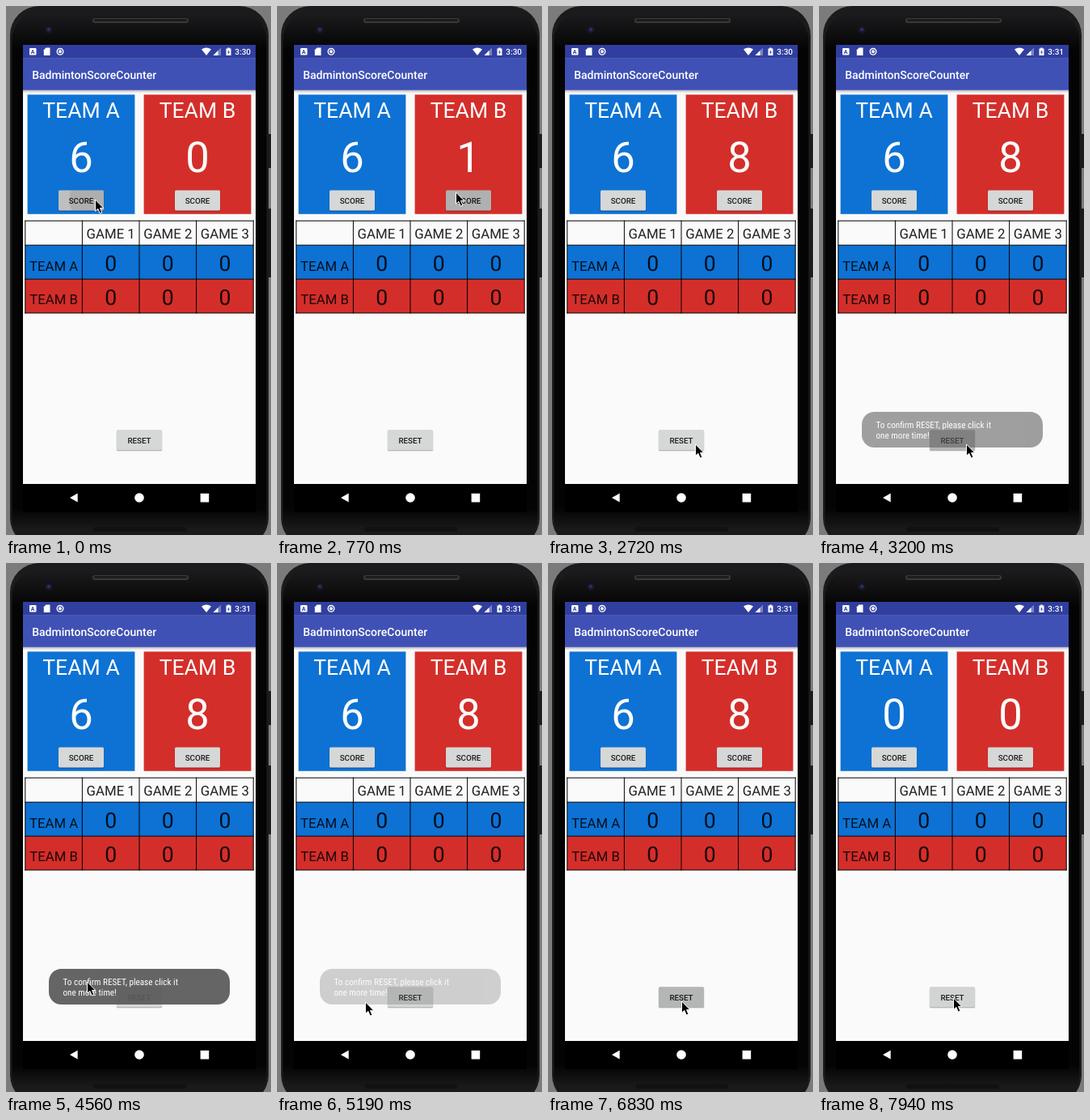
These frames come from a looping animation (328x653 px, 8 s). An HTML page:

```html
<!DOCTYPE html>
<html lang="en">
<head>
<meta charset="utf-8">
<title>Score counter</title>
<style>
html, body { margin: 0; width: 100%; height: 100%; overflow: hidden; background: #7b7b7b; }
svg { display: block; width: 328px; height: 653px; }
text { font-family: Roboto, Arial, sans-serif; text-rendering: geometricPrecision; }
.mid { text-anchor: middle; }
.white { fill: #fff; }
.dark { fill: #000; fill-opacity: .87; }
.team { font-size: 26.6px; }
.score { font-size: 52.5px; }
.cell { font-size: 16.8px; }
.label { font-size: 9.8px; font-weight: 500; }
.toast { font: 11.2px "Roboto Condensed", Roboto, sans-serif; font-stretch: 75%; }
</style>
</head>
<body>
<svg viewBox="0 0 328 653">
  <defs>
    <linearGradient id="body" x2="0" y2="1">
      <stop offset="0" stop-color="#1c1c1e"/><stop offset=".07" stop-color="#040405"/>
      <stop offset=".93" stop-color="#040405"/><stop offset=".97" stop-color="#1a1a1a"/>
    </linearGradient>
    <linearGradient id="shade" x2="0" y2="1">
      <stop offset="0" stop-color="#000" stop-opacity=".28"/><stop offset="1" stop-color="#000" stop-opacity="0"/>
    </linearGradient>
    <clipPath id="clipA"><rect x="65" y="227.5" width="56" height="25" rx="1.5"/></clipPath>
  </defs>

  <!-- phone -->
  <rect width="328" height="653" fill="#7b7b7b"/>
  <rect x="325" y="158" width="3" height="42" fill="#1c1c1e"/>
  <rect x="325" y="250" width="3" height="85" fill="#1c1c1e"/>
  <rect x="5" y="0" width="320" height="668" rx="36" fill="#1b1b1d"/>
  <rect x="7.5" y="8" width="315" height="658" rx="34" fill="url(#body)"/>
  <rect x="107" y="15" width="119" height="6" rx="3" fill="#3b3937"/>
  <rect x="109" y="16" width="115" height="3" rx="1.5" fill="#1d1c1c"/>
  <circle cx="53" cy="29" r="5.5" fill="#14151d"/>
  <circle cx="53" cy="29" r="2.5" fill="#272c5c"/>
  <rect x="108" y="643" width="115" height="6" rx="3" fill="#111"/>

  <!-- screen -->
  <rect x="21" y="48" width="288" height="577" fill="#000"/>
  <rect x="21" y="48" width="288" height="542" fill="#fafafa"/>
  <rect x="21" y="103.5" width="288" height="4" fill="url(#shade)"/>
  <rect x="21" y="64.8" width="288" height="39" fill="#3f51b5"/>
  <rect x="21" y="48" width="288" height="16.8" fill="#303f9f"/>
  <g fill="#fff">
    <rect x="29" y="52" width="8.5" height="8.5" rx="1"/>
    <path d="M49.5 51.5H54.5V61H46.800V54.3Z"/>
    <circle cx="67" cy="56.3" r="3.8" fill="none" stroke="#fff" stroke-width="1.4"/>
    <circle cx="67" cy="56.3" r="2"/>
    <path d="M242 53.5Q248 49.5 254 53.5L248 61Z"/>
    <path d="M266 51.5V61H256.5Z" fill-opacity=".35"/>
    <path d="M262.5 55V61H256.5Z"/>
    <path d="M274.3 51.5h2.4v1h1.8v8.5h-6v-8.5h1.8z"/>
    <path d="M79 607L88.7 601.5V612.5Z"/>
    <circle cx="165" cy="607" r="5.8"/>
    <rect x="240.6" y="601.8" width="10.6" height="10.6" rx=".5"/>
  </g>
  <path d="M276 54l-2 3.5h1.4l-.4 2.5 2-3.5h-1.4z" fill="#303f9f"/>
  <text x="33.2" y="58.9" class="mid" font-size="7" font-weight="700" fill="#303f9f">A</text>
  <text id="clock" x="303" y="60.2" text-anchor="end" class="white" font-size="10" font-weight="500"></text>
  <text x="32.2" y="89.5" class="white" font-size="14" font-weight="500">BadmintonScoreCounter</text>

  <g id="cards"></g>
  <g id="table"></g>
  <g id="buttons"></g>
  <circle id="ripple" cx="110" cy="239" r="31.5" fill-opacity=".09" clip-path="url(#clipA)"/>

  <g id="toast">
    <rect x="53" y="501" width="224" height="44" rx="15.5" fill="#5a5a5a" fill-opacity=".93"/>
    <text x="70.5" y="521" class="toast white">To confirm RESET, please click it</text>
    <text x="70.5" y="534.3" class="toast white">one more time!</text>
  </g>
  <path id="cursor" d="M.5 0V14.3L3.8 11.3L6.3 17.1L8.9 16L6.5 10.4H10.8Z" stroke="#fff" stroke-width="1" stroke-linejoin="round"/>
</svg>
<script>
const LOOP = 8000;
const BLUE = '#0d72d4', RED = '#d42e2a';
const $ = id => document.getElementById(id);
const add = (id, markup) => $(id).insertAdjacentHTML('beforeend', markup);
const rect = (x, y, w, h, fill, more = '') =>
  `<rect x="${x}" y="${y}" width="${w}" height="${h}" fill="${fill}" ${more}/>`;
const label = (x, y, cls, str, more = '') =>
  `<text x="${x}" y="${y}" class="mid ${cls}" ${more}>${str}</text>`;

function card(mid, name, fill) {
  add('cards', rect(mid - 66.4, 109.4, 132.8, 147.4, fill) +
    label(mid, 138.1, 'team white', 'TEAM ' + name) +
    label(mid, 205.3, 'score white', '', `id="score${name}"`));
}

function button(id, mid, y, str) {
  const x = mid - 28;
  add('buttons', rect(x - .5, y + 1, 57, 25.5, '#000', 'rx="2" opacity=".12"') +
    rect(x, y + .5, 56, 25.3, '#000', 'rx="1.5" opacity=".22"') +
    rect(x, y, 56, 25, '#d6d7d7', 'rx="1.5"') +
    rect(x, y, 56, 25, '#000', `rx="1.5" id="${id}"`) +
    label(mid, y + 16.2, 'label dark', str));
}

function table() {
  const left = 23.8, cell = 70.6, right = left + 4 * cell;
  const rows = [265.2, 295.2, 337.2, 379];
  let out = rect(left, rows[1], 4 * cell, 42, BLUE) + rect(left, rows[2], 4 * cell, 41.8, RED);
  let lines = rows.map(y => `M${left} ${y}H${right}`).join('');
  for (let i = 0; i < 5; i++) lines += `M${left + i * cell} ${rows[0]}V${rows[3]}`;
  out += `<path d="${lines}" stroke="#000" fill="none" stroke-linecap="square"/>`;
  for (let i = 1; i < 4; i++) {
    const x = left + (i + .5) * cell;
    out += label(x, 287.2, 'cell dark', 'GAME ' + i) +
      label(x, 327.2, 'team dark', 0) + label(x, 369, 'team dark', 0);
  }
  out += label(left + cell / 2, 326.5, 'cell dark', 'TEAM A') +
    label(left + cell / 2, 368.2, 'cell dark', 'TEAM B');
  add('table', out);
}

card(93, 'A', BLUE);
card(237, 'B', RED);
table();
button('pressA', 93, 227.5, 'SCORE');
button('pressB', 237, 227.5, 'SCORE');
button('pressReset', 165, 523.3, 'RESET');

// Cursor moves: first step, last step, step count, path after the previous end.
const START = [110, 239];
const MOVES = [
  [50, 290, 5, [[221, 230]]],
  [2300, 2720, 8, [[182, 541]]],
  [3790, 4320, 10, [[100, 517]]],
  [4620, 4900, 6, [[109, 542]]],
  [5720, 6060, 7, [[104, 548], [118, 553], [165, 541]]],
  [7940, 7941, 1, [[166, 537]]]
];
const CLICKS = [650, 780, 920, 1050, 1180, 1320, 1880, 2060];
const RESET = 6890;

const clamp = v => Math.max(0, Math.min(1, v));
const easeOut = v => 1 - (1 - clamp(v)) ** 2;

function along(points, p) {
  const s = p * (points.length - 1), i = Math.min(Math.floor(s), points.length - 2);
  return points[i].map((v, k) => v + (points[i + 1][k] - v) * (s - i));
}

function cursorAt(t) {
  let pos = START;
  for (const [t0, t1, n, path] of MOVES) {
    if (t < t0) break;
    const step = Math.floor((t - t0) / (t1 - t0) * (n - 1) + 1e-6) + 1;
    pos = along([pos, ...path], clamp(step / n));
  }
  return pos;
}

function pressB(t) {
  if (t < 590 || t >= 2120) return 0;
  const last = CLICKS.filter(c => c - 60 <= t).pop();
  return .06 + .12 * clamp(1 - (t - last) / 130);
}

function pressReset(t) {
  if (t >= 3020 && t < 3500) return .16 * clamp((3500 - t) / 260);
  if (t >= 6830) return Math.max(.02, .16 * clamp((7010 - t) / 120));
  return 0;
}

function draw(t) {
  const done = t >= RESET;
  $('clock').textContent = t < 3020 ? '3:30' : '3:31';
  $('scoreA').textContent = done ? 0 : 6;
  $('scoreB').textContent = done ? 0 : CLICKS.filter(c => c <= t).length;
  $('pressA').setAttribute('opacity', t < 50 ? .11 : 0);
  $('ripple').setAttribute('opacity', t < 50 ? 1 : 0);
  $('pressB').setAttribute('opacity', pressB(t));
  $('pressReset').setAttribute('opacity', pressReset(t));
  $('toast').setAttribute('opacity', easeOut((t - 3015) / 500) - easeOut((t - 4960) / 500));
  $('cursor').setAttribute('transform', `translate(${cursorAt(t)})`);
}

const begin = performance.now();
function tick() {
  draw((performance.now() - begin) % LOOP);
  requestAnimationFrame(tick);
}
tick();
</script>
</body>
</html>
```
